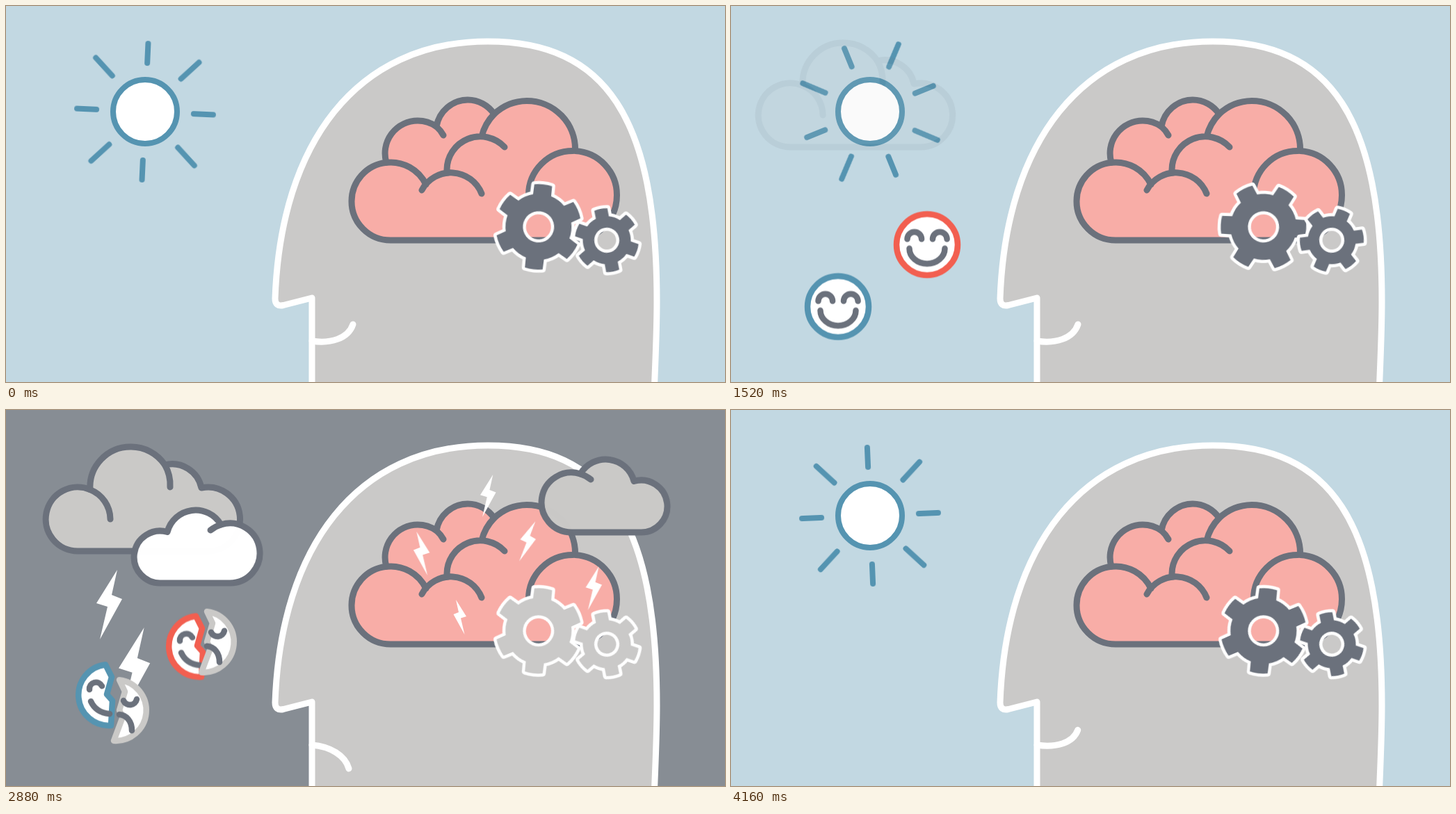
Animation, 1034 px wide and 541 px high, one loop 4240 ms. Source, as an HTML page:

```html
<!DOCTYPE html>
<html lang="en">
<head>
<meta charset="utf-8">
<title>Weather of the mind</title>
<style>
html, body { margin: 0; width: 100%; height: 100%; overflow: hidden; }
svg { display: block; width: 100vw; height: 100vh; animation: sky 4.24s linear infinite; }
svg * { animation: 0s linear infinite; animation-duration: 4.24s; }

.line { fill: none; stroke: #6b717c; stroke-width: 9; stroke-linecap: round; stroke-linejoin: round; }
.head { fill: #cac9c8; stroke: #fff; stroke-width: 9; stroke-linejoin: round; }
.mouth { fill: none; stroke: #fff; stroke-width: 9; stroke-linecap: round; animation-name: mouth; }
.grey { fill: #cac9c7; }
.white { fill: #fff; }
.features { stroke-width: 8.5; }
.rim { fill: #fff; stroke-width: 8.5; stroke-linejoin: round; }
.cool { stroke: #5594b1; }
.warm { stroke: #f25f50; }
.pale { stroke: #cac9c7; }

.sun { fill: #fff; stroke: #5594b1; stroke-width: 8; stroke-linecap: round; animation-name: sun; }
.rays { animation-name: rays; }
.gear { fill: #6b717c; stroke: #fff; stroke-width: 9; stroke-linejoin: round; paint-order: stroke; animation-name: turn, tint; }
#bigGear { --a: 6.5deg; --d: -1; }
#smallGear { --a: -11deg; --d: 1; }

.cloudA { animation-name: cloudA; }
.cloudB { animation-name: cloudB; }
.cloudC { animation-name: cloudC; }
.storm { animation-name: storm; }
.zap > * { animation-name: zap; animation-fill-mode: both; }
.zap > :nth-child(2) { animation-delay: -.06s; }
.zap > :nth-child(3) { animation-delay: -.12s; }
.zap > :nth-child(4) { animation-delay: -.18s; }
.zap > :nth-child(5) { animation-delay: -.24s; }

.blue { animation-name: blueMove, blueFade; }
.red { animation-name: redMove, redFade; }
.blue .whole { animation-name: blueWhole; }
.blue .half { animation-name: blueHalf, blueSplit; }
.red .whole { animation-name: redWhole; }
.red .half { animation-name: redHalf, redSplit; }
.blue .left { --x: -7px; --y: -11px; }
.blue .right { --x: 5px; --y: 11px; }
.red .left { --x: -5px; --y: 3.5px; }
.red .right { --x: 3px; --y: -3px; }

@keyframes sky {
  0%, 39.6% { background: #c2d8e2; }
  43.4% { background: #abc2cf; }
  49.1%, 86.8% { background: #878d94; }
  90.57% { background: #99a7b1; }
  98.1%, 100% { background: #c2d8e2; }
}
@keyframes sun {
  0%, 42.4% { opacity: 1; }
  47.2%, 87.7% { opacity: 0; }
  97.2%, 100% { opacity: 1; }
}
@keyframes rays {
  0% { transform: rotate(2.6deg); }
  26.42% { transform: rotate(50.9deg); }
  43.4% { transform: rotate(81.4deg); }
  90.57% { transform: rotate(165deg); }
  98.11% { transform: rotate(177.6deg); }
  100% { transform: rotate(182.6deg); }
}
@keyframes turn {
  0% { transform: rotate(var(--a)); }
  26.42% { transform: rotate(calc(var(--a) + var(--d) * 75deg)); }
  43.4% { transform: rotate(calc(var(--a) + var(--d) * 108.5deg)); }
  52.83%, 100% { transform: rotate(calc(var(--a) + var(--d) * 120deg)); }
}
@keyframes tint {
  0%, 46.2% { fill: #6b717c; }
  59.4%, 80.2% { fill: #cac9c8; }
  89.6%, 100% { fill: #6b717c; }
}
@keyframes mouth {
  0%, 46.2% { d: path("M440 482 C466 486 492 479 499 458"); animation-timing-function: ease-in-out; }
  59.4%, 86.8% { d: path("M440 482 C466 484 488 497 493 516"); animation-timing-function: ease-in-out; }
  100% { d: path("M440 482 C466 486 492 479 499 458"); }
}
@keyframes cloudA {
  0%, 34.9% { opacity: 0; transform: translateX(-20px); }
  43.4% { opacity: .85; transform: translateX(-1px); }
  45.3%, 69.8% { opacity: 1; transform: none; }
  80.2%, 100% { opacity: 0; transform: translateX(-18px); }
}
@keyframes cloudB {
  0%, 40.6% { opacity: 0; transform: translateX(12px); }
  49.1%, 67.9% { opacity: 1; transform: none; }
  77.4%, 100% { opacity: 0; transform: translateX(18px); }
}
@keyframes cloudC {
  0%, 50.9% { opacity: 0; transform: translateX(6px); }
  52.83% { opacity: .2; transform: none; }
  58.5%, 67.9% { opacity: 1; transform: translateX(-14px); }
  77.8%, 100% { opacity: 0; transform: translateX(30px); }
}
@keyframes storm {
  0%, 47.2% { opacity: 0; transform: none; }
  51.9%, 73.6% { opacity: 1; transform: none; }
  80.2%, 100% { opacity: 0; transform: translateY(3px); }
}
@keyframes zap {
  0%, 60.4% { opacity: 0; }
  64.2%, 85.8% { opacity: 1; }
  89.6%, 100% { opacity: 0; }
}
@keyframes blueMove {
  0%, 7.55% { transform: translate(154px, 456px); }
  13.2% { transform: translate(154px, 442px); }
  26.42% { transform: translate(154px, 437.5px); }
  43.4% { transform: translate(154px, 428.5px); }
  52.83% { transform: translate(154px, 420px); }
  79.25%, 100% { transform: translate(154px, 422px); }
}
@keyframes blueFade {
  0%, 7.55% { opacity: 0; }
  15.1%, 80.2% { opacity: 1; }
  86.8%, 100% { opacity: 0; }
}
@keyframes redMove {
  0%, 11.3% { transform: translate(282px, 366px); }
  17% { transform: translate(282px, 352px); }
  26.42% { transform: translate(282px, 347.5px); }
  43.4% { transform: translate(282px, 340px); }
  52.83% { transform: translate(282px, 331px); }
  79.25%, 100% { transform: translate(282px, 341px); }
}
@keyframes redFade {
  0%, 11.3% { opacity: 0; }
  18.9%, 84% { opacity: 1; }
  91.1%, 100% { opacity: 0; }
}
@keyframes blueWhole { 0%, 41.5% { opacity: 1; } 46.2%, 100% { opacity: 0; } }
@keyframes blueHalf { 0%, 41.5% { opacity: 0; } 46.2%, 100% { opacity: 1; } }
@keyframes blueSplit { 0%, 41.5% { transform: none; } 49.1%, 100% { transform: translate(var(--x), var(--y)); } }
@keyframes redWhole { 0%, 45.3% { opacity: 1; } 49.1%, 100% { opacity: 0; } }
@keyframes redHalf { 0%, 45.3% { opacity: 0; } 49.1%, 100% { opacity: 1; } }
@keyframes redSplit { 0%, 45.3% { transform: none; } 51.9%, 100% { transform: translate(var(--x), var(--y)); } }
</style>
</head>
<body>
<svg viewBox="0 0 1034 541" preserveAspectRatio="none">
  <defs>
    <path id="bolt" fill="#fff" d="M12-50 L-18-2 L-2 3 L-13 50 L19-8 L4-14 Z"/>
    <g id="puff">
      <path class="line" style="fill: inherit" d="M223 249 A37.5 37.5 0 1 1 232 175.5 A42 42 0 0 1 309 165 A43 43 0 1 1 322 249 Z"/>
      <path class="line" d="M309 165 A43 43 0 0 0 294 173"/>
    </g>
    <path id="smile" class="line features" d="M-28.5-8 a10.3 10.3 0 0 1 20.6 0 M8-8 a10.3 10.3 0 0 1 20.6 0 M-25.5 5.5 A25.5 22 0 0 0 25.5 5.5"/>
    <path id="leftRim" d="M-4-43.8 A44 44 0 0 0 4 43.8 L6 8 L-2-1 L5-26 Z"/>
    <path id="leftFace" class="line features" d="M-27-8 A9.5 9.5 0 0 1 -9-13 M-25 9 C-20 20 -10 26 2 27"/>
    <path id="rightRim" d="M4-43.8 A44 44 0 0 1 -4 43.8 L9 9 L4 0 L12-27 Z"/>
    <path id="rightFace" class="line features" d="M10-14 A10 10 0 0 0 29-16 M4 6 C14 7 22 15 22 29"/>
  </defs>

  <g transform="translate(200 152)">
    <g class="sun">
      <circle r="46"/>
      <g class="rays" id="rays"></g>
    </g>
  </g>

  <g class="cloudA">
    <path class="line" style="fill: #cac9c7" d="M103 203 A46 46 0 1 1 121 114.6 A58 58 0 0 1 179 53 A58 58 0 0 1 228.5 79 A43 43 0 0 1 281 112 A46 46 0 1 1 291 203 Z"/>
    <path class="line" d="M121 114.6 A46 46 0 0 1 150 157 M228.5 79 A58 58 0 0 1 236 111"/>
  </g>
  <g class="cloudB white"><use href="#puff"/></g>

  <g class="storm">
    <use href="#bolt" transform="translate(148 280)"/>
    <use href="#bolt" transform="translate(184 374) scale(1.22)"/>
  </g>

  <g class="blue">
    <g class="whole"><circle class="rim cool" r="44"/><use href="#smile"/></g>
    <g class="half left"><use href="#leftRim" class="rim cool"/><use href="#leftFace"/></g>
    <g class="half right"><use href="#rightRim" class="rim pale"/><use href="#rightFace"/></g>
  </g>
  <g class="red">
    <g class="whole"><circle class="rim warm" r="44"/><use href="#smile"/></g>
    <g class="half left"><use href="#leftRim" class="rim warm"/><use href="#leftFace"/></g>
    <g class="half right"><use href="#rightRim" class="rim pale"/><use href="#rightFace"/></g>
  </g>

  <path class="head" d="M440 560 V420 L399 430.5 Q387 433 387 421 C395 197 504 51 693 51 C863 51 936 161 936 425 C936 470 934 505 932 560 Z"/>
  <path class="mouth" d="M440 482 C466 486 492 479 499 458"/>

  <path class="line" style="fill: #f8ada7" d="M553 337 A56 56 0 0 1 497 281 A56 56 0 0 1 547 225.3
    A47 47 0 0 1 592 165 A47 47 0 0 1 619 173.5 A46 46 0 0 1 664 135 A46 46 0 0 1 702 155.5
    A69.5 69.5 0 0 1 749 136.5 A69.5 69.5 0 0 1 818.5 208.5 A63.5 63.5 0 0 1 878.5 272 A63.5 65 0 0 1 815 337 Z"/>
  <path class="line" d="M547 225.3 A56 56 0 0 1 604 257 M619 173.5 A47 47 0 0 1 629 186 M684 188 A69.5 69.5 0 0 1 702 155.5
    M751.5 272 A63.5 63.5 0 0 1 815 208.5 M634 236 A48 48 0 0 1 717 203 M598 265 A47.4 47.4 0 0 1 684 270"/>

  <g class="zap">
    <g><use href="#bolt" transform="translate(693 123.5) scale(.61)"/></g>
    <g><use href="#bolt" transform="translate(750 189) rotate(8) scale(.6)"/></g>
    <g><use href="#bolt" transform="translate(845 256.5) scale(.63)"/></g>
    <g><use href="#bolt" transform="translate(598 206.5) scale(-.63 .63)"/></g>
    <g><use href="#bolt" transform="translate(653 298) scale(-.5 .5)"/></g>
  </g>

  <g transform="translate(765.8 317.8)"><path class="gear" id="bigGear"/></g>
  <g transform="translate(864 337)"><path class="gear" id="smallGear"/></g>

  <g class="cloudC grey"><use href="#puff" transform="translate(1149 -73) scale(-1 1)"/></g>
</svg>

<script>
const LOOP = 4240, STEP = 80;
const byId = id => document.getElementById(id);

const polar = (radius, degrees) => {
  const a = (degrees - 90) * Math.PI / 180;
  return `${(radius * Math.cos(a)).toFixed(2)} ${(radius * Math.sin(a)).toFixed(2)}`;
};

// Six teeth on a disc with a round hole.
function gearPath(tip, root, hole) {
  let d = "";
  for (let a = 0; a < 360; a += 60) {
    d += `${a ? `A${root} ${root} 0 0 1 ` : "M"}${polar(root, a - 16)}`
      + `L${polar(tip, a - 12)}A${tip} ${tip} 0 0 1 ${polar(tip, a + 12)}L${polar(root, a + 16)}`;
  }
  return `${d}A${root} ${root} 0 0 1 ${polar(root, -16)}Z`
    + `M${hole} 0A${hole} ${hole} 0 1 0 ${-hole} 0A${hole} ${hole} 0 1 0 ${hole} 0Z`;
}
byId("bigGear").setAttribute("d", gearPath(61.5, 47.5, 22.5));
byId("smallGear").setAttribute("d", gearPath(46, 34.5, 18));

// Short rays alternate with long ones.
byId("rays").innerHTML = Array.from({ length: 8 }, (_, i) =>
  `<path d="M${polar(70, i * 45)}L${polar(i % 2 ? 105 : 98, i * 45)}"/>`).join("");

// Hold every pose for one step of the loop.
const animations = document.getAnimations();
animations.forEach(a => a.pause());
function tick(now) {
  const time = Math.floor(now % LOOP / STEP) * STEP;
  animations.forEach(a => { a.currentTime = time; });
  requestAnimationFrame(tick);
}
tick(performance.now());
</script>
</body>
</html>
```
